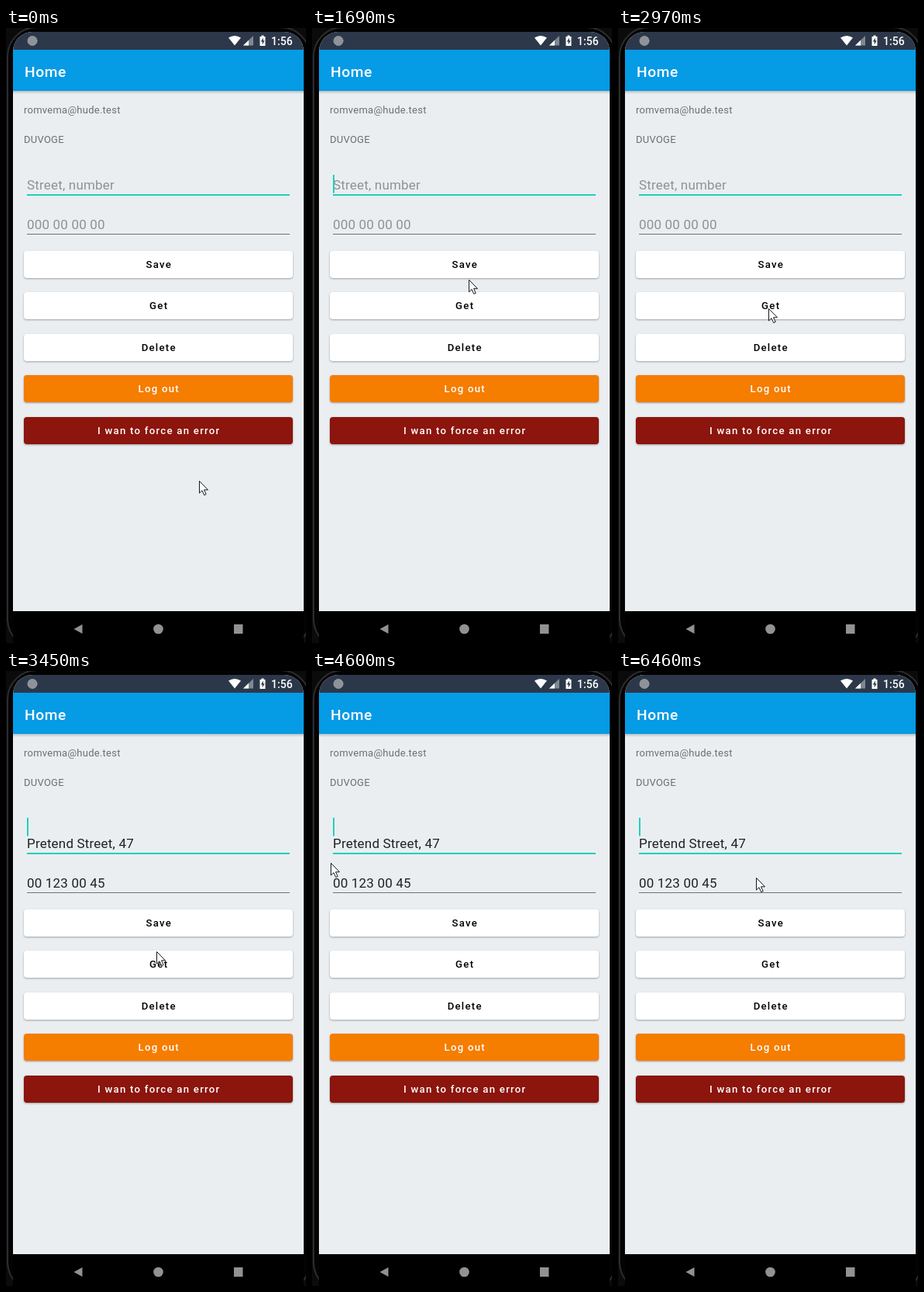
Recreate the animation shown at these times as an HTML page. Size 387 by 792 pixels, loop 6810 ms.

```html
<!DOCTYPE html>
<html lang="en">
<head>
<meta charset="utf-8">
<title>Home screen</title>
<style>
  html, body { margin: 0; width: 100%; height: 100%; overflow: hidden; background: #0b0b0c; }
  svg { display: block; width: 387px; height: 792px; font-family: Roboto, sans-serif; }
  .label { font-size: 13px; letter-spacing: .25px; fill: #6c7073; }
  .field { font-size: 17px; letter-spacing: .18px; fill: #8e9295; }
  .filled .field { fill: #202124; }
  .button text { font-size: 13.2px; font-weight: 500; letter-spacing: 1.25px; text-anchor: middle; }
  .button rect { filter: drop-shadow(0 1.5px .8px rgba(0, 0, 0, .32)); }
</style>
</head>
<body>
<svg viewBox="0 0 387 792">
  <defs>
    <clipPath id="screen"><rect x="9" y="5" width="375" height="820" rx="25"/></clipPath>
    <linearGradient id="barShadow" x2="0" y2="1">
      <stop stop-color="#000" stop-opacity=".2"/>
      <stop offset="1" stop-color="#000" stop-opacity="0"/>
    </linearGradient>
  </defs>
  <rect x="2" y="-1" width="390" height="800" rx="38" fill="#030304" stroke="#2d2d2f" stroke-width="2"/>

  <g clip-path="url(#screen)">
    <rect width="387" height="752" fill="#eaeef1"/>
    <rect width="387" height="28" fill="#2c384a"/>
    <rect y="28" width="387" height="53" fill="#059be5"/>
    <rect y="81" width="387" height="4" fill="url(#barShadow)"/>
    <rect y="751" width="387" height="41"/>
  </g>

  <circle cx="34" cy="16.5" r="6" fill="#8d9399"/>
  <circle cx="34" cy="16.5" r="6" fill="none" stroke="#c3c7cb" stroke-dasharray="1.2 1"/>
  <g fill="#fff">
    <path d="M287 12.5Q295 7.5 303 12.5L295 22.5Z"/>
    <path d="M306 22.5L319 10V22.5Z" opacity=".4"/>
    <path d="M306 22.5L313 15.8V22.5Z"/>
    <path d="M327.5 11H329.5V9.5H332.5V11H334.5V23H327.5Z"/>
    <path d="M331.8 12.5L328.8 17.5H330.7V21.5L333.6 16.3H331.8Z" fill="#2c384a"/>
    <text x="342" y="22" font-size="14" font-weight="500">1:56</text>
    <text x="24" y="62.5" font-size="19.2" font-weight="500" letter-spacing=".55">Home</text>
  </g>
  <g fill="#929292">
    <path d="M87.5 774L98.5 768V780Z"/>
    <circle cx="196.5" cy="774" r="6.3"/>
    <rect x="294" y="768" width="11.5" height="12"/>
  </g>

  <text class="label" x="23" y="110">romvema@hude.test</text>
  <text class="label" x="23" y="148">DUVOGE</text>

  <g id="form">
    <text id="street" class="field" x="27" y="208"></text>
    <path d="M27 215H366" stroke="#20d0bd" stroke-width="2"/>
    <text id="phone" class="field" x="27" y="258.5"></text>
    <path d="M27 265.5H366" stroke="#717477"/>
  </g>
  <rect id="caret" x="27" y="189" width="2" height="23.5" fill="#20d0bd"/>
  <path id="pointer" d="M.5 .5V16L4 12.7L6.7 18.6L9.2 17.5L6.5 11.8H11.5Z" fill="#fff" stroke="#15171a"/>
</svg>

<script>
const LOOP = 6810, FRAME = 65, BLINK = 504, FIRST_BLINK = 410;
const PRESS = 2490, RELEASE = 2770, LOADED = 3450;
const $ = id => document.getElementById(id);
const form = $('form'), street = $('street'), phone = $('phone');

const buttons = [
  ['Save', '#fff', '#000'],
  ['Get', '#fff', '#000'],
  ['Delete', '#fff', '#000'],
  ['Log out', '#f57d00', '#fff'],
  ['I wan to force an error', '#8c150d', '#fff']
];
form.insertAdjacentHTML('beforeend', buttons.map(([label, fill, ink], i) =>
  `<g class="button" transform="translate(23 ${Math.floor(287 + 53.5 * i)})">
    <rect width="347" height="35" rx="4" fill="${fill}"/>
    <text x="174.2" y="22" fill="${ink}">${label}</text>
  </g>`).join(''));
const getButton = form.querySelectorAll('.button rect')[1];

// Each move eases along a quadratic curve from the previous resting place
const moves = [
  { begin: 70, end: 410, bend: [236, 440], to: [220, 305] },
  { begin: 680, end: 1030, bend: [214, 301], to: [207, 303] },
  { begin: 1690, end: 1960, bend: [200, 332], to: [194, 361] },
  { begin: 3910, end: 4600, bend: [40, 85], to: [24, 247] },
  { begin: 4660, end: 5140, bend: [110, 205], to: [174, 260] },
  { begin: 5340, end: 5470, bend: [177, 262], to: [179, 264] },
  { begin: 5800, end: 5930, bend: [179, 265], to: [178, 266] }
];

function progress(t, { begin, end }) {
  const step = time => Math.floor((time - begin) / FRAME) + 1;
  return 1 - (1 - Math.min(1, step(t) / step(end))) ** 2;
}

function pointerAt(t) {
  let at = [249, 583];
  for (const move of moves) {
    if (t < move.begin) break;
    const u = progress(t, move), v = 1 - u;
    at = at.map((from, k) => v * v * from + 2 * u * v * move.bend[k] + u * u * move.to[k]);
  }
  return at;
}

function draw(t) {
  const filled = t >= LOADED;
  form.setAttribute('transform', `translate(0 ${filled ? 20 : 0})`);
  form.setAttribute('class', filled ? 'filled' : '');
  street.textContent = filled ? 'Pretend Street, 47' : 'Street, number';
  phone.textContent = filled ? '00 123 00 45' : '000 00 00 00';

  const pressed = t >= PRESS && t < RELEASE;
  getButton.setAttribute('fill', pressed ? '#e6e6e6' : '#fff');

  const caretOn = Math.floor((t - FIRST_BLINK) / BLINK) % 2 === 0;
  $('caret').setAttribute('opacity', +caretOn);
  $('pointer').setAttribute('transform', `translate(${pointerAt(t)})`);
}

const origin = performance.now();
function tick() {
  draw((performance.now() - origin) % LOOP);
  requestAnimationFrame(tick);
}
tick();
</script>
</body>
</html>
```
